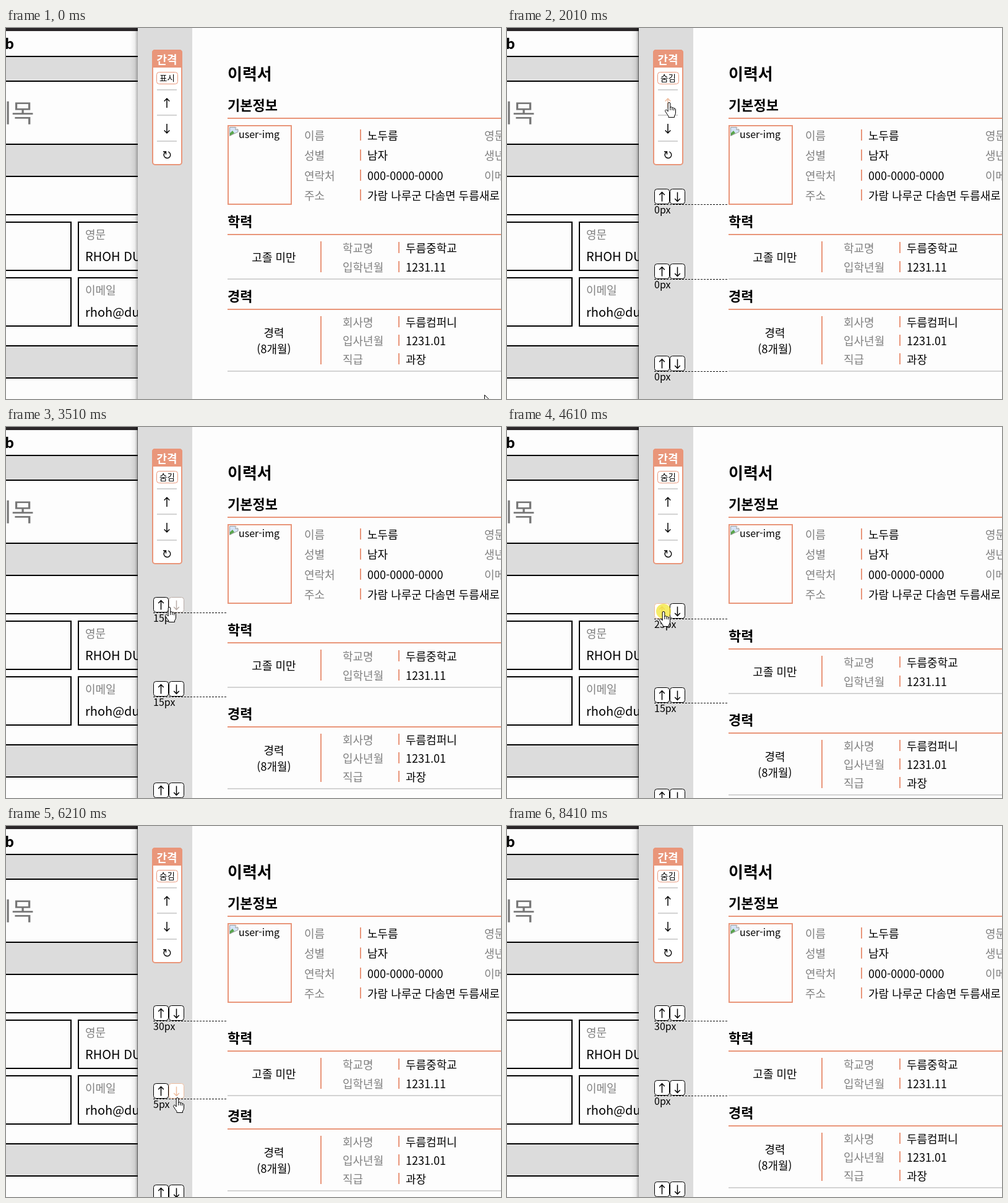
An HTML page for the animation above (8510 ms loop, 800 by 600 pixels).

```html
<!DOCTYPE html>
<html lang="ko">
<head>
<meta charset="utf-8">
<title>이력서 간격 조절</title>
<style>
html, body { margin: 0; width: 100%; height: 100%; overflow: hidden; background: #fdfdfd; }
svg { display: block; width: 800px; height: 600px; }
text { font-family: "Noto Sans CJK KR", "Noto Sans CJK", "Noto Sans KR", "Noto Sans CJK JP", sans-serif; white-space: pre; }
.btn { color: #000; }
.btn.hover { color: #efbd9f; }
.btn.half { color: #b9aca6; }
#show .edge { stroke: #e9967a; }
#show.hover .edge { stroke: #efbd9f; }
</style>
</head>
<body>
<svg id="stage" viewBox="0 0 800 600"></svg>
<script>
const LOOP = 8510, ACCENT = "#e9967a", GREY = "#dcdcdc", LABEL = "#808080", RULE = "#d3d3d3";

const rect = (x, y, w, h, fill, more = "") =>
  `<rect x="${x}" y="${y}" width="${w}" height="${h}" fill="${fill}" ${more}/>`;
const text = (x, y, s, size = 18, fill = "#000", more = "") =>
  `<text x="${x}" y="${y}" font-size="${size}" fill="${fill}" ${more}>${s}</text>`;
const mid = 'text-anchor="middle"', end = 'text-anchor="end"', bold = 'font-weight="700"';
const frame = (x, y, w, h, color) =>
  rect(x + 1, y + 1, w - 2, h - 2, "none", `stroke="${color}" stroke-width="2"`);

// Vertical arrow around a centre; dir is -1 for up, 1 for down.
const arrow = (x, y, dir) =>
  `<path d="M${x} ${y - 7.5 * dir}V${y + 7 * dir}M${x - 4.3} ${y + 3 * dir}L${x} ${y + 7.5 * dir}L${x + 4.3} ${y + 3 * dir}"
    fill="none" stroke="currentColor" stroke-width="1.5"/>`;

const field = (x, bar, y, label, value) =>
  text(x, y, label, 18, LABEL) + rect(bar, y - 16.5, 2, 18, ACCENT) + text(bar + 12, y, value);

const heading = (y, s) =>
  text(358, y, s, 22, "#000", bold) + rect(358, y + 12, 442, 2, ACCENT);

function leftPane() {
  let s = rect(0, 0, 213, 600, "#fdfdfd");
  for (const [y, h] of [[46, 40], [188, 52], [514, 52]]) s += rect(0, y, 213, h, GREY);
  for (const y of [45, 85, 187, 239, 301, 513, 565]) s += rect(0, y, 213, 2, "#000");
  for (const y of [313, 403]) s += frame(-100, y, 206, 80, "#000") + frame(116, y, 200, 80, "#000");
  s += rect(0, 0, 213, 5, "#2b2729");
  s += text(13, 34, "b", 23, "#000", end + ' font-weight="600"');
  s += text(45.5, 152, "제목", 40, "#777", end);
  s += text(128, 340.5, "영문", 18, LABEL) + text(128, 377, "RHOH DU RUM", 20);
  s += text(128, 430.5, "이메일", 18, LABEL) + text(128, 467, "rhoh@durum", 20);
  s += rect(201, 0, 12, 600, "url(#shade)");
  s += `<g id="edge">${rect(212, 0, 1, 600, "#000", 'opacity=".45"')}</g>`;
  return `<g clip-path="url(#left)">${s}</g>`;
}

function toolbar() {
  let s = rect(237, 36, 47, 185, "#fff", `rx="4" stroke="${ACCENT}" stroke-width="2"`);
  s += `<path d="M236 64V40Q236 35 241 35H280Q285 35 285 40V64Z" fill="${ACCENT}"/>`;
  s += text(260, 57.5, "간격", 18, "#fff", mid + " " + bold);
  s += `<g id="show" class="btn">${rect(243.5, 71.5, 34, 19, "#fff", 'class="edge" rx="4"')}
    <text id="word" x="260.5" y="86" font-size="13.5" fill="currentColor" ${mid}></text></g>`;
  for (const y of [99, 140, 182]) s += rect(244, y, 32, 2, RULE);
  s += `<g id="up" class="btn">${arrow(260, 121.5, -1)}</g>` + arrow(260, 162.5, 1);
  s += `<path d="M254 200H258.5V204.5M257.8 200.6A5.3 5.3 0 1 0 262.2 200.2" fill="none" stroke="#000" stroke-width="1.4"/>`;
  return s;
}

function profile() {
  let s = text(358, 83.5, "이력서", 26, "#000", bold) + heading(133, "기본정보");
  s += frame(358, 157, 104, 129, ACCENT);
  s += `<path d="M361.5 160.5H371L375 164.5V168L361.5 174.5Z" fill="#d5e3f7" stroke="#999"/>
    <path d="M362 174V170L366 166L369 170Z" fill="#58a54b"/><path d="M371 160.5V164.5H375" fill="#fff" stroke="#999"/>`;
  s += text(376, 178, "user-img", 16);
  s += field(482, 572, 180.5, "이름", "노두름") + field(482, 572, 213, "성별", "남자");
  s += field(482, 572, 245.5, "연락처", "000-0000-0000");
  s += field(482, 572, 277.5, "주소", "가람 나루군 다솜면 두름새로 1");
  ["영문", "생년월일", "이메일"].forEach((l, i) => s += text(773, 180.5 + i * 32.5, l, 18, LABEL));
  return s;
}

const school = () => heading(321, "학력") + text(433, 377.5, "고졸 미만", 18, "#000", mid) +
  rect(508, 345, 2, 50, ACCENT) + field(544, 634, 362.5, "학교명", "두름중학교") +
  field(544, 634, 393.5, "입학년월", "1231.11") + rect(358, 405, 442, 2, RULE);

const career = () => heading(442, "경력") + text(433, 499.5, "경력", 18, "#000", mid) +
  text(433, 525.5, "(8개월)", 18, "#000", mid) + rect(508, 466, 2, 78, ACCENT) +
  field(544, 634, 482.5, "회사명", "두름컴퍼니") + field(544, 634, 512.5, "입사년월", "1231.01") +
  field(544, 634, 542.5, "직급", "과장") + rect(358, 554, 442, 2, RULE);

function gapRow(n, y) {
  const btn = (x, dir, id) => `<g id="${id}" class="btn">
    ${rect(x + .5, y - 25 + .5, 24, 24, "#fff", 'rx="4" stroke="currentColor"')}${arrow(x + 12.5, y - 12, dir)}</g>`;
  return `<g id="row${n}"><path d="M238 ${y + .5}H358" stroke="#000" stroke-dasharray="3 2"/>
    ${btn(238, -1, "up" + n)}${btn(263, 1, "down" + n)}
    <text id="gap${n}" x="238" y="${y + 15}" font-size="16"></text></g>`;
}

const pointers = `
  <path id="arrow" d="M.5 .5V15.5L4 12.2L6.6 18L9 17L6.5 11.3H11.3Z" fill="#fff" stroke="#000"/>
  <path id="hand" d="M-1.8 2Q-1.8 .5 0 .5Q1.8 .5 1.8 2V9Q2.2 7.4 3.6 7.6Q5 7.8 5 9.6Q5.4 8.3 6.6 8.6Q7.8 9 7.8 10.6
    Q8.2 9.8 9.3 10.1Q10.5 10.5 10.5 12V17Q10.5 20 8.5 22V24.5H-1V22.4Q-3 20 -6 15.2Q-7 13.3 -5.6 12.5
    Q-4.2 11.8 -2.8 13.6L-1.8 15Z M1.8 9V13M5 9.6V13M7.8 10.6V13.5" fill="#fff" stroke="#000" stroke-linejoin="round"/>
  <path id="beam" d="M-3.5 -7.5H-1Q0 -7.5 0 -6Q0 -7.5 1 -7.5H3.5M0 -6.5V6.5M-3.5 7.5H-1Q0 7.5 0 6Q0 7.5 1 7.5H3.5"
    fill="none" stroke="#000"/>`;

const $ = id => document.getElementById(id);
$("stage").innerHTML = `<defs><clipPath id="left">${rect(0, 0, 213, 600, "#000")}</clipPath>
  <linearGradient id="shade"><stop offset="0" stop-opacity="0"/><stop offset=".6" stop-opacity=".06"/><stop offset="1" stop-opacity=".3"/></linearGradient></defs>
  ${rect(0, 0, 301, 600, GREY)}${rect(301, 0, 499, 600, "#fdfdfd")}
  ${leftPane()}${toolbar()}${profile()}
  <g id="school">${school()}</g><g id="career">${career()}</g>
  <g id="rows">${gapRow(1, 285)}${gapRow(2, 406)}${gapRow(3, 555)}</g>
  <circle id="click" r="12" fill="#f2e52e" fill-opacity=".72"/><g id="cursor">${pointers}</g>`;

// time, x, y, pointer, hovered button
const path = [
  [0, 773, 593, "arrow"], [300, 478, 333, "arrow"], [500, 290, 45, "arrow"],
  [600, 262, 80, "hand", "show"], [1400, 262, 80, "hand", "show"], [1600, 262, 105, "arrow"],
  [1810, 262, 118, "hand", "up"], [2010, 262, 120, "hand", "up"], [3010, 262, 120, "hand", "up"],
  [3110, 262, 135, "arrow"], [3410, 266, 285, "hand", "down1"], [3510, 264, 291, "hand", "down1"],
  [3710, 253, 298, "hand", "up1"], [4710, 253, 298, "hand", "up1"], [4810, 256, 318, "arrow"],
  [5110, 277, 442, "hand", "down2"], [5610, 278, 442, "hand", "down2"], [5810, 277, 439, "hand", "down2"],
  [6310, 277, 439, "hand", "down2"], [6410, 277, 439, "arrow"], [6710, 400, 500, "beam"],
  [6910, 448, 511, "beam"], [7110, 296, 440, "arrow"], [7310, 440, 363, "arrow"],
  [7710, 543, 230, "beam"], [7910, 658, 363, "arrow"], [8110, 790, 575, "arrow"], [8210, 810, 590, ""]
];
// time, then the gap under each block
const gaps = [
  [0, 0, 0, 0], [2310, 5, 5, 5], [2710, 10, 10, 10], [3010, 15, 15, 15], [4010, 20, 15, 15],
  [4410, 25, 15, 15], [4710, 30, 15, 15], [5410, 30, 10, 15], [6110, 30, 5, 15], [6410, 30, 0, 15]
];
const clicks = [1100, 3010, 3910, 4310, 4610, 5310, 6010, 6310];

const shift = (id, y) => $(id).setAttribute("transform", `translate(0 ${y})`);
const visible = (id, on) => $(id).style.display = on ? "" : "none";

function draw(ms) {
  const off = ms < 1910 ? 0 : 10;
  const t = Math.floor((ms - off) / 100) * 100 + off;

  const i = path.findLastIndex(k => k[0] <= t), a = path[i], b = path[i + 1] || a;
  const p = b === a ? 0 : (t - a[0]) / (b[0] - a[0]);
  const at = `translate(${Math.round(a[1] + (b[1] - a[1]) * p)} ${Math.round(a[2] + (b[2] - a[2]) * p)})`;
  $("cursor").setAttribute("transform", at);
  $("click").setAttribute("transform", at);
  visible("click", clicks.includes(t));
  for (const kind of ["arrow", "hand", "beam"]) visible(kind, a[3] === kind);
  for (const id of ["show", "up", "up1", "down1", "down2"])
    $(id).setAttribute("class", "btn" + (a[4] !== id ? "" : id === "down1" ? " half" : " hover"));

  const open = t >= 1200;
  visible("rows", open);
  visible("edge", open && t < 8410);
  $("word").textContent = open ? "숨김" : "표시";
  let sum = 0;
  gaps.findLast(g => g[0] <= t).slice(1).forEach((g, n) => {
    sum += g;
    shift("row" + (n + 1), sum);
    $("gap" + (n + 1)).textContent = g + "px";
    if (n < 2) shift(["school", "career"][n], sum);
  });
}

const start = performance.now();
function tick() {
  draw((performance.now() - start) % LOOP);
  requestAnimationFrame(tick);
}
tick();
</script>
</body>
</html>
```
